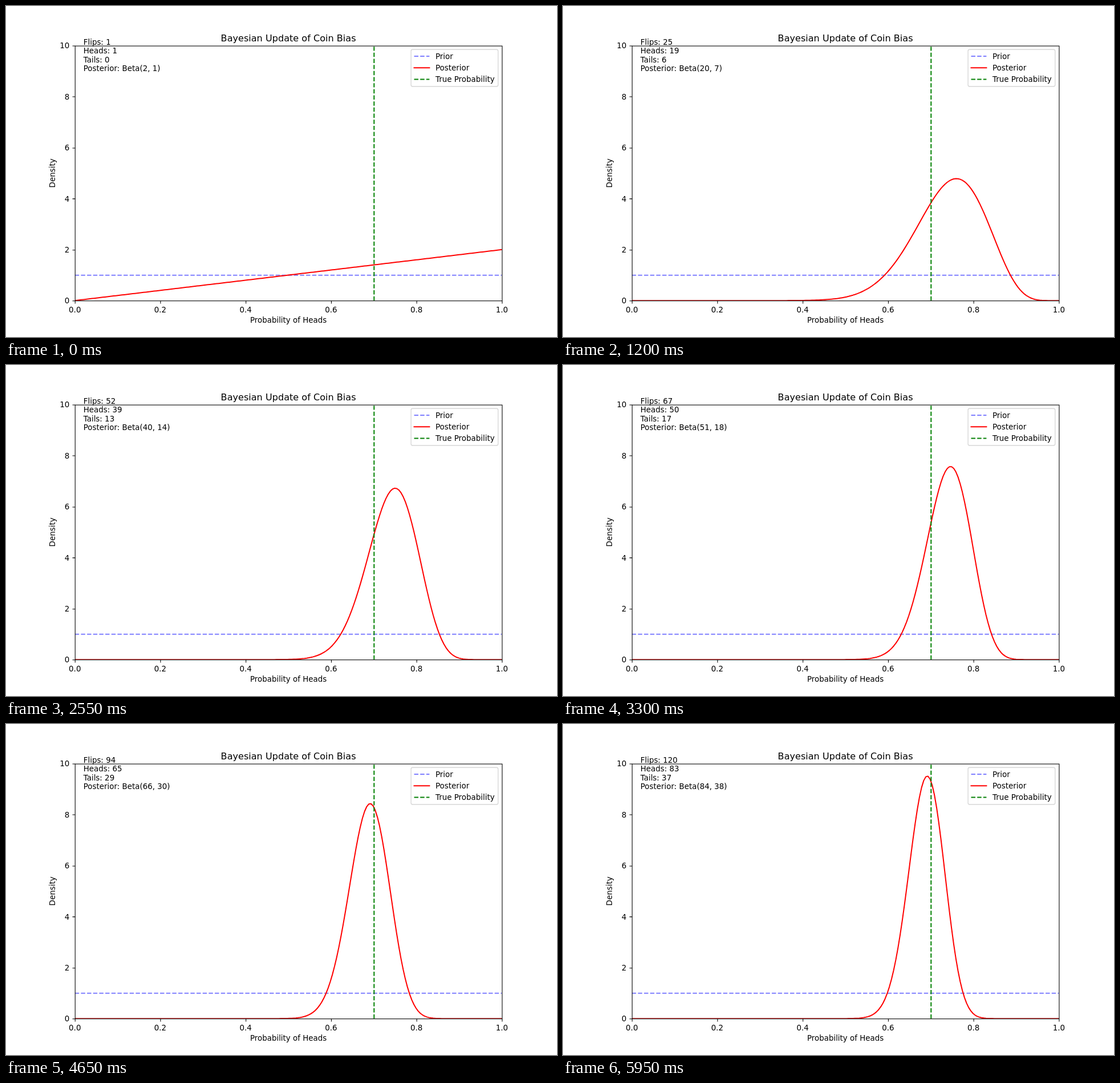
An HTML page with a canvas that plays this animation: 966 by 580 pixels, repeating every 6000 ms.

```html
<!DOCTYPE html>
<html lang="en">
<head>
<meta charset="utf-8">
<title>Bayesian Update of Coin Bias</title>
<style>
  html, body { margin: 0; width: 100%; height: 100%; overflow: hidden; background: #fff; }
  canvas { display: block; }
</style>
</head>
<body>
<canvas id="plot" width="966" height="580"></canvas>
<script>
const ctx = document.getElementById('plot').getContext('2d');

// Layout uses a 1000 x 600 figure, scaled to the stage.
const SX = 0.966, SY = 580 / 600;
const LEFT = 125, RIGHT = 900, TOP = 72, BOTTOM = 534;
const PT = 100 / 72, LINE = 1.5 * PT, THIN = 0.8 * PT;
const DASH = [3.7 * LINE, 1.6 * LINE];
const BLUE = 'rgba(0,0,255,0.5)', RED = '#f00', GREEN = '#008000';
const STEP = 50, FLIPS = 120, POINTS = 200;

// Flips that land on tails; all others are heads.
const tailFlips = [2, 3, 8, 10, 12, 13, 26, 34, 35, 36, 44, 51, 52, 53, 54, 56, 63,
  68, 70, 71, 74, 75, 76, 77, 81, 87, 89, 92, 93, 95, 105, 108, 113, 114, 116, 117, 119];

const px = x => LEFT + x * (RIGHT - LEFT);
const py = y => BOTTOM - y / 10 * (BOTTOM - TOP);
const snap = v => Math.round(v) + 0.5;

function stroke(points, color, width, dash = []) {
  ctx.beginPath();
  for (const [x, y] of points) ctx.lineTo(x, y);
  ctx.strokeStyle = color;
  ctx.lineWidth = width;
  ctx.setLineDash(dash);
  ctx.lineCap = dash.length ? 'butt' : 'square';
  ctx.lineJoin = 'round';
  ctx.stroke();
  ctx.setLineDash([]);
}

function text(str, x, y, align = 'left', size = 10) {
  ctx.font = `${size * PT}px "DejaVu Sans", sans-serif`;
  ctx.textAlign = align;
  ctx.fillStyle = '#000';
  ctx.fillText(str, x, y);
}

// Density of Beta(h + 1, t + 1)
function betaCurve(h, t) {
  let scale = h + t + 1;
  for (let i = 1; i <= t; i++) scale *= (h + i) / i;
  return Array.from({ length: POINTS }, (_, i) => {
    const x = i / (POINTS - 1);
    return [px(x), py(scale * x ** h * (1 - x) ** t)];
  });
}

function drawAxes() {
  ctx.lineCap = 'butt';
  for (let k = 0; k <= 5; k++) {
    const x = snap(px(k / 5)), y = snap(py(k * 2));
    ctx.beginPath();
    ctx.moveTo(x, BOTTOM + 0.5);
    ctx.lineTo(x, BOTTOM + 5.36);
    ctx.moveTo(LEFT + 0.5, y);
    ctx.lineTo(LEFT - 4.36, y);
    ctx.strokeStyle = '#000';
    ctx.lineWidth = THIN;
    ctx.stroke();
    text((k / 5).toFixed(1), px(k / 5), 555, 'center');
    text(String(k * 2), 115.3, Math.round(py(k * 2) + 5.3), 'right');
  }
  ctx.lineJoin = 'miter';
  ctx.strokeRect(LEFT + 0.5, TOP + 0.5, RIGHT - LEFT, BOTTOM - TOP);

  text('Bayesian Update of Coin Bias', 512.5, 64, 'center', 12);
  text('Probability of Heads', 512.5, 574, 'center');
  ctx.save();
  ctx.translate(89, 303);
  ctx.rotate(-Math.PI / 2);
  text('Density', 0, 0, 'center');
  ctx.restore();
}

function drawLegend() {
  ctx.beginPath();
  ctx.roundRect(735.1, 78.9, 158, 67, 2.78);
  ctx.fillStyle = 'rgba(255,255,255,0.8)';
  ctx.fill();
  ctx.strokeStyle = 'rgba(204,204,204,0.8)';
  ctx.lineWidth = PT;
  ctx.stroke();
  const rows = [['Prior', BLUE, DASH], ['Posterior', RED, []], ['True Probability', GREEN, DASH]];
  rows.forEach(([label, color, dash], i) => {
    const y = Math.round(90.7 + i * 20.9);
    stroke([[740.7, y], [768.5, y]], color, LINE, dash);
    text(label, 779.5, y + 5);
  });
}

function draw(flips) {
  const tails = tailFlips.filter(n => n <= flips).length;
  const heads = flips - tails;

  ctx.setTransform(1, 0, 0, 1, 0, 0);
  ctx.fillStyle = '#fff';
  ctx.fillRect(0, 0, 966, 580);
  ctx.scale(SX, SY);

  ctx.save();
  ctx.beginPath();
  ctx.rect(LEFT, TOP, RIGHT - LEFT, BOTTOM - TOP);
  ctx.clip();
  const prior = Math.round(py(1)), truth = Math.round(px(0.7));
  stroke([[LEFT, prior], [RIGHT, prior]], BLUE, LINE, DASH);
  stroke(betaCurve(heads, tails), RED, LINE);
  stroke([[truth, BOTTOM], [truth, TOP]], GREEN, LINE, DASH);
  ctx.restore();

  drawAxes();
  const info = [`Flips: ${flips}`, `Heads: ${heads}`, `Tails: ${tails}`,
    `Posterior: Beta(${heads + 1}, ${tails + 1})`];
  info.forEach((str, i) => text(str, 140.5, Math.round(118.2 - (3 - i) * 16.2)));
  drawLegend();
}

let shown = 0;
function tick() {
  const flips = Math.floor(performance.now() / STEP) % FLIPS + 1;
  if (flips !== shown) draw(shown = flips);
  requestAnimationFrame(tick);
}
tick();
</script>
</body>
</html>
```
